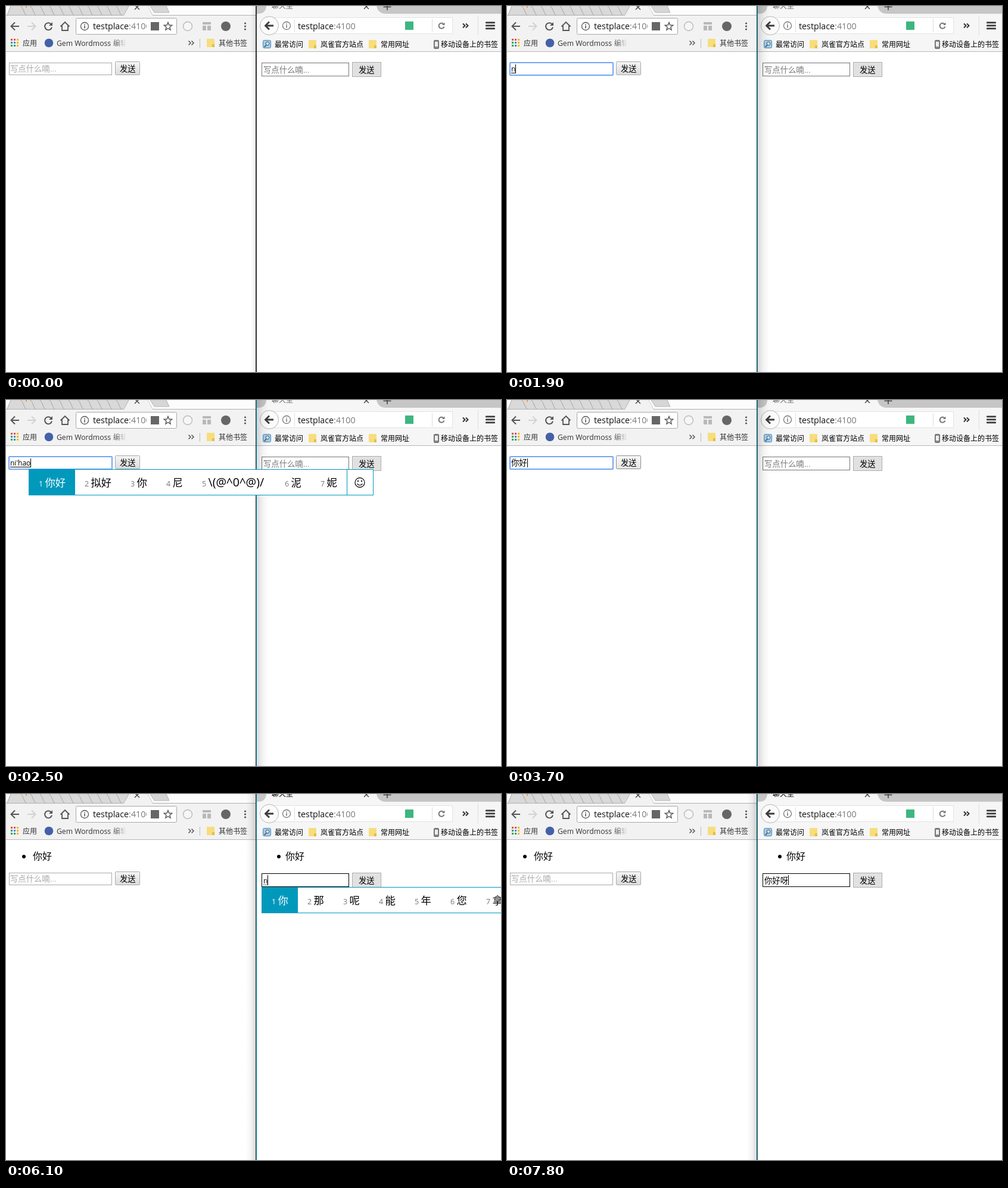
Write an HTML page that moves like this. It is 831 px wide and 614 px high and loops after 8000 ms.

```html
<!DOCTYPE html>
<html lang="zh">
<head>
<meta charset="utf-8">
<style>
html, body { margin: 0; width: 100%; height: 100%; overflow: hidden; background: #fff }
svg { display: block; width: 831px; height: 614px }
text { font-family: "Open Sans", "Noto Sans CJK SC", "Noto Sans CJK", sans-serif; white-space: pre }
.field { font-family: "Liberation Sans", "Noto Sans CJK SC", "Noto Sans CJK", sans-serif }
</style>
</head>
<body>
<svg viewBox="0 0 831 614">
  <defs>
    <linearGradient id="toLeft"><stop stop-opacity="0"/><stop offset=".5" stop-opacity=".045"/><stop offset="1" stop-opacity=".15"/></linearGradient>
    <linearGradient id="toRight"><stop stop-opacity=".15"/><stop offset=".5" stop-opacity=".045"/><stop offset="1" stop-opacity="0"/></linearGradient>
    <linearGradient id="fade"><stop stop-color="#f2f2f2" stop-opacity="0"/><stop offset="1" stop-color="#f2f2f2"/></linearGradient>
    <linearGradient id="plain" x2="0" y2="1"><stop stop-color="#f6f6f6"/><stop offset="1" stop-color="#dcdcdc"/></linearGradient>
    <linearGradient id="hover" x2="0" y2="1"><stop stop-color="#fafafa"/><stop offset="1" stop-color="#e4e4e4"/></linearGradient>
    <linearGradient id="down" x2="0" y2="1"><stop stop-color="#dcdcdc"/><stop offset="1" stop-color="#f0f0f0"/></linearGradient>
    <clipPath id="address"><rect x="140" y="20" width="96" height="28"/></clipPath>
  </defs>
  <g id="chrome"></g>
  <g id="page"></g>
</svg>
<script>
const TEAL = '#0099bc', LOOP = 8000, HINT = '写点什么喃...';

const rect = (x, y, w, h, fill, extra = '') =>
  `<rect x="${x}" y="${y}" width="${w}" height="${h}" fill="${fill}" ${extra}/>`;
const frame = (x, y, w, h, stroke, fill = '#fff', extra = '') =>
  rect(x + .5, y + .5, w - 1, h - 1, fill, `stroke="${stroke}" ${extra}`);
const line = (d, stroke, width = 1, extra = '') =>
  `<path d="${d}" fill="none" stroke="${stroke}" stroke-width="${width}" ${extra}/>`;
const shape = (d, fill) => `<path d="${d}" fill="${fill}"/>`;
const circle = (x, y, r, fill, extra = '') => `<circle cx="${x}" cy="${y}" r="${r}" fill="${fill}" ${extra}/>`;
const text = (x, y, size, str, fill = '#000', extra = '') =>
  `<text x="${x}" y="${y}" font-size="${size}" fill="${fill}" ${extra}>${str}</text>`;
const field = (x, y, str, fill = '#000') => text(x, y, 13.33, str, fill, 'class="field"');

const info = (x, y, c) => circle(x, y, 6.5, 'none', `stroke="${c}" stroke-width="1.3"`) +
  rect(x - .8, y - 1, 1.6, 4.5, c) + rect(x - .8, y - 3.5, 1.6, 1.6, c);
const arrow = (x, y, c, w, dir = 1) =>
  line(`M${x + 7 * dir} ${y}H${x - 6 * dir}M${x} ${y - 6.5}L${x - 6.5 * dir} ${y}L${x} ${y + 6.5}`, c, w);
const reload = (x, y, c, r) =>
  line(`M${x + r * .8} ${y - r * .6}A${r} ${r} 0 1 0 ${x + r} ${y + 1.5}`, c, 2) +
  shape(`M${x + r + 1} ${y - r - 1}v${r}h${-r}z`, c);
const folder = (x, y) => rect(x, y, 13, 14, '#f7dd7c', 'rx="1"') + rect(x + 9, y + 9, 4, 5, '#e5bd48');
const more = (x, y, c, w) => line(`M${x - 4.5} ${y - 3.5}l3.5 3.5l-3.5 3.5m5 -7l3.5 3.5l-3.5 3.5`, c, w);
const cross = (x, y) => line(`M${x - 4} ${y - 4}l8 8m0 -8l-8 8`, '#444', 1.4);
const address = (x, y) => text(x, y, 14.3, 'testplace<tspan fill="#777">:4100</tspan>', '#111');

function leftWindow() {
  let s = rect(0, 0, 419, 15, '#fcfcfc') + shape('M8 0H207L198 15H2z', '#d9d9d9') + line('M8 0L2 15', '#aaa');
  for (let x = 25; x < 195; x += 16) s += line(`M${x} 0q3 3 5 9t4 6`, '#a5a5a5');
  s += rect(33, 0, 2, 3, '#e8a33c') +
    rect(0, 15, 419, 61, '#f2f2f2') + line('M0 15.5H198L206 0M238 0L246 15.5H419', '#b0b0b0') +
    shape('M207 0H238L246 16H198z', '#f2f2f2') + cross(220, 2) +
    shape('M242 0H269L274 11H249z', '#d6d6d6') + line('M269 0L274 11H249L242 0', '#b5b5b5') +
    rect(0, 76, 419, 1, '#b8b8b8');
  s += arrow(15, 34, '#555', 2) + arrow(43, 34, '#d2d2d2', 2, -1) + reload(71, 34, '#555', 6) +
    line('M91.5 34.5L99 27L106.5 34.5M94 33V41H104V33', '#555', 1.8) +
    frame(117, 20, 170, 28, '#a8a8a8', '#fff', 'rx="2"') + info(132, 34, '#555') +
    `<g clip-path="url(#address)">${address(146, 39)}</g>` + rect(243, 27, 14, 14, '#666');
  let star = '';
  for (let i = 0; i < 10; i++) {
    const r = i % 2 ? 3 : 7, a = i * Math.PI / 5;
    star += `${272 + r * Math.sin(a)},${34.5 - r * Math.cos(a)} `;
  }
  s += `<polygon points="${star}" fill="none" stroke="#555" stroke-width="1.4"/>` +
    circle(305, 34, 7.5, '#f6f6f6', 'stroke="#bbb" stroke-width="1.4"') +
    rect(330, 27, 14, 4, '#b9b9b9') + rect(330, 33, 6, 8, '#b9b9b9') + rect(338, 33, 6, 8, '#b9b9b9') +
    circle(369, 34, 8, '#666');
  for (const y of [29, 34, 39]) s += circle(401.5, y, 1.6, '#555');
  const dots = ['#de5246', '#de5246', '#f4b400', '#1aa260', '#4285f4', '#f4b400', '#1aa260', '#1aa260', '#f4b400'];
  dots.forEach((c, i) => s += rect(8 + i % 3 * 5, 55 + (i / 3 | 0) * 5, 3, 3, c));
  return s + text(28, 66.5, 12, '应用', '#333') + circle(72, 62, 7.3, '#4461a8') +
    text(85, 66.5, 12.2, 'Gem Wordmoss', '#333') + text(180, 66.5, 12, '编辑', '#333') +
    rect(178, 54, 24, 18, 'url(#fade)') + rect(202, 54, 10, 18, '#f2f2f2') +
    more(311, 62, '#555', 1.5) + rect(325, 55, 1, 15, '#bbb') + folder(337, 55) + text(357, 66.5, 12, '其他书签', '#333');
}

function rightWindow() {
  let s = rect(421, 0, 410, 13, '#c6c6c6') + shape('M421 13Q436 14 437 0H622Q625 14 640 13z', '#f6f6f6') +
    rect(421, 13, 410, 63, '#f6f6f6') + rect(421, 76, 410, 1, '#b8b8b8') +
    cross(605, 1) + line('M633.5 1.5H646.5M640 0V7', '#444', 1.6);
  s += frame(445, 19, 305, 28, '#e2e2e2') + circle(442, 33, 15.5, '#fbfbfb', 'stroke="#b5b5b5"') +
    arrow(442, 33, '#3c3c3c', 2.8) + info(471, 33, '#777') + rect(484, 22, 1, 22, '#ddd') + address(490, 38.5) +
    rect(670, 26, 14, 14, '#3db680') + rect(715, 22, 1, 22, '#ddd') + reload(731, 33, '#777', 4.5) +
    more(771.5, 33, '#333', 2) + rect(792, 16, 1, 33, '#ddd');
  for (const y of [26.5, 31.5, 36.5]) s += rect(805, y, 16, 2.8, '#3c3c3c', 'rx="1"');
  s += frame(431, 57, 14, 14, '#4d86b8', '#a5cbe8', 'rx="2"') + circle(439, 63, 2.8, '#e9f4fc', 'stroke="#356"') +
    line('M437 65.5l-3.5 3.5', '#356', 1.6) + folder(508, 57) + folder(609, 57) +
    frame(718, 57, 9, 15, '#666', '#888', 'rx="1.5"') + rect(720, 60, 5, 8, '#e8eef4');
  const marks = [[451, '最常访问'], [528, '岚雀官方站点'], [629, '常用网址'], [730, '移动设备上的书签']];
  for (const [x, label] of marks) s += text(x, 68.5, 12, label);
  return s;
}

const pen = document.createElement('canvas').getContext('2d');
function width(str, font) {
  pen.font = font;
  return pen.measureText(str).width;
}
const textWidth = str => width(str, '13.33px "Liberation Sans", "Noto Sans CJK SC", "Noto Sans CJK", sans-serif');
const compWidth = str => width(str, '12px "Open Sans", sans-serif');
const typedWidth = s => textWidth(s.text) + compWidth(s.comp);

// Input method bar: numbered words, the first one selected.
function wordBar(x, y, words) {
  let num = x + 17, cells = '';
  words.forEach((word, i) => {
    const face = word.includes('@');
    const next = num + 43 + (face ? 96 : 17 * word.length);
    if (!i) cells += rect(x, y, next - 16 - x, 44, TEAL);
    cells += text(num, y + 28.5, 12.5, i + 1, i ? '#777' : '#fff') +
      text(num + 10.5, y + 29, face ? 19.6 : 17.3, word, i ? '#000' : '#fff');
    num = next;
  });
  const end = num - 16, cx = end + 22, cy = y + 22.5;
  return frame(x, y, end + 45 - x, 44, TEAL) + cells + rect(end, y, 1, 44, TEAL) +
    circle(cx, cy, 8, 'none', 'stroke="#111" stroke-width="1.3"') +
    circle(cx - 3, cy - 2.5, 1.2, '#111') + circle(cx + 3, cy - 2.5, 1.2, '#111') +
    line(`M${cx - 4.5} ${cy + 2}q4.5 5 9 0`, '#111', 1.2);
}

function entry(x, base, s, dotted) {
  const done = x + textWidth(s.text), end = x + typedWidth(s);
  let out = field(x, base, s.text);
  if (s.comp) out += text(done, base, 12, s.comp) +
    line(`M${done} ${base + 2.5}H${end}`, '#000', 1, dotted ? 'stroke-dasharray="1 1"' : '');
  if (s.caret) out += rect(Math.round(end), base - (dotted ? 14 : 12), 1, dotted ? 17 : 15, '#000');
  return out;
}

function page(s) {
  const yl = s.sent ? 37 : 0, yr = s.sent ? 38 : 0, left = s.active === 'L', right = s.active === 'R';
  let out = '';
  if (s.sent) for (const x of [30, 458]) out += circle(x, 105, 3, '#000');
  if (s.sent) for (const x of [45, 469]) out += text(x, 110, 16, '你好');
  out += s.ring
    ? rect(5, 95, 173, 21, '#fff', 'stroke="#74a5f6" stroke-width="2" rx="1"')
    : frame(5, 95 + yl, 173, 21, '#a9a9a9');
  out += left && s.text + s.comp + s.caret ? entry(7, 110, s) : field(7, 110 + yl, HINT, '#a9a9a9');
  out += frame(183, 93 + yl, 42, 23, s.button === 'plain' ? '#a9a9a9' : '#8f8f8f', `url(#${s.button})`, 'rx="1"') +
    field(191, 109.8 + yl, '发送');
  out += frame(429, 95 + yr, 147, 23, s.edge) + frame(581, 94 + yr, 49, 25, '#adadad', '#e1e1e1') + field(592, 111.8 + yr, '发送');
  if (!right || !(s.text + s.comp)) out += field(432, 111.8 + yr, HINT, '#777');
  if (right) out += entry(432, 112 + yr, s, true);
  out += text(446, 4, 12, '聊天室', right ? '#000' : '#666');
  if (left) out += rect(421, 0, 20, 614, 'url(#toRight)');
  else out += rect(right ? 403 : 410, 0, right ? 16 : 9, 614, 'url(#toLeft)', right ? '' : 'opacity=".7"');
  out += rect(419, 0, 2, 614, '#333');
  if (s.active) out += rect(420, 0, 1, 614, TEAL);
  if (s.words) out += left
    ? wordBar(Math.round(7 + typedWidth(s)) - 3, 116, s.words)
    : wordBar(429 + Math.round(textWidth(s.text)), 156, s.words);
  return out;
}

const split = str => str.split(' ');
const N = split('你 那 呢 能 年 您 拿'), NI = split('你 尼 泥 拟 妮 逆 腻'),
  NIH = split('你好 你会 你还 你和 拟好 你很 你后'), NIHAO = split('你好 拟好 你 尼 \\(@^0^@)/ 泥 妮'),
  Y = split('也 一 有 要 又 用 与'), YA = split('呀 压 牙 亚 鸭 雅 丫');

// Each step changes only the listed parts of the state.
const steps = [
  [0, { active: '', ring: 0, text: '', comp: '', caret: '', words: null, button: 'plain', edge: '#767676', sent: 0 }],
  [900, { active: 'L', ring: 1, caret: 1 }],
  [1400, { caret: '' }],
  [1900, { comp: 'n', caret: 1 }],
  [2000, { words: N }],
  [2100, { comp: 'ni', words: NI }],
  [2200, { comp: "ni'h", words: NIH }],
  [2400, { comp: "ni'ha", words: NIHAO }],
  [2500, { comp: "ni'hao" }],
  [2800, { text: '你好', comp: '', words: null }],
  [3300, { caret: '' }],
  [3500, { button: 'hover' }],
  [3700, { caret: 1 }],
  [4000, { button: 'down', ring: 0, caret: '' }],
  [4100, { button: 'hover', text: '', sent: 1 }],
  [4500, { button: 'plain' }],
  [4700, { edge: '#000' }],
  [5300, { active: 'R', caret: 1 }],
  [5800, { caret: '' }],
  [6100, { comp: 'n', caret: 1, words: N }],
  [6200, { comp: 'ni', words: NI }],
  [6400, { comp: "ni'h", words: NIH }],
  [6500, { comp: "ni'ha", words: NIHAO }],
  [6600, { comp: "ni'hao" }],
  [7100, { caret: '' }],
  [7200, { text: '你好', comp: '', caret: 1, words: null }],
  [7300, { comp: 'y' }],
  [7400, { words: Y }],
  [7500, { comp: 'ya', words: YA }],
  [7800, { text: '你好呀', comp: '', words: null }]
];

document.getElementById('chrome').innerHTML = leftWindow() + rightWindow();
const stage = document.getElementById('page'), start = performance.now();
let shown = -1;

function tick() {
  const t = (performance.now() - start) % LOOP;
  const past = steps.filter(([at]) => at <= t);
  if (past.length !== shown) {
    shown = past.length;
    stage.innerHTML = page(Object.assign({}, ...past.map(([, change]) => change)));
  }
  requestAnimationFrame(tick);
}
tick();
</script>
</body>
</html>
```
